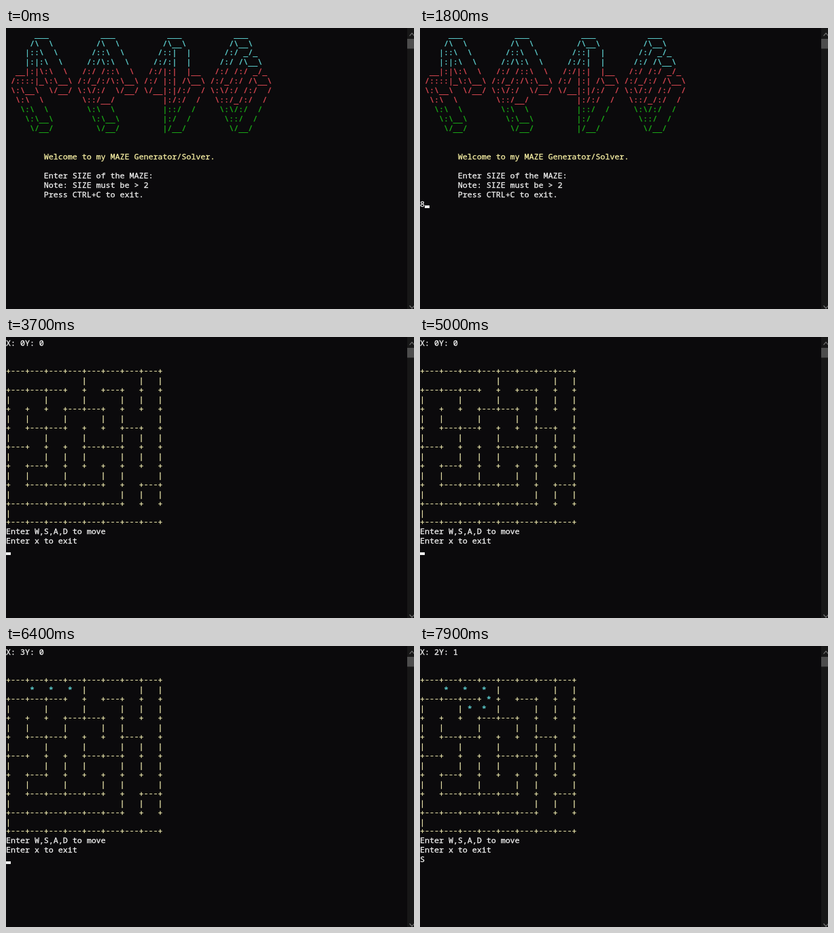
Recreate the animation shown at these times as an HTML page with a canvas. Size 600 by 415 pixels, loop 8000 ms.

```html
<!DOCTYPE html>
<html lang="en">
<head>
<meta charset="utf-8">
<title>Maze console</title>
<style>
html, body { margin: 0; width: 100%; height: 100%; overflow: hidden; background: #0b0a0c; }
canvas { display: block; }
</style>
</head>
<body>
<canvas id="stage" width="600" height="415"></canvas>
<script>
const ctx = document.getElementById('stage').getContext('2d');
const LOOP = 8000, BLINK = 530;
const CELL_W = 6.98, ROW_H = 13.94, BASE = 12.6;
const WHITE = '#f2f2f2', YELLOW = '#f9f1a5', CREAM = '#f5f0b4';
const CYAN = '#61d6d6', RED = '#e04a55', GREEN = '#1cb018';
// Console glyphs whose height differs from the font's own.
const SHIFT = { '-': -1, '_': 1 };

const banner = String.raw`
      ___           ___           ___           ___
     /\  \         /\  \         /\__\         /\__\
    |::\  \       /::\  \       /::|  |       /:/ _/_
    |:|:\  \     /:/\:\  \     /:/:|  |      /:/ /\__\
  __|:|\:\  \   /:/ /::\  \   /:/|:|  |__   /:/ /:/ _/_
 /::::|_\:\__\ /:/_/:/\:\__\ /:/ |:| /\__\ /:/_/:/ /\__\
 \:\__\  \/__/ \:\/:/  \/__/ \/__|:|/:/  / \:\/:/ /:/  /
  \:\  \        \::/__/          |:/:/  /   \::/_/:/  /
   \:\  \        \:\  \          |::/  /     \:\/:/  /
    \:\__\        \:\__\         |:/  /       \::/  /
     \/__/         \/__/         |/__/         \/__/`.split('\n').slice(1);

// One bit per wall segment: horizontal lines, then the rows between them.
const floors = ['11111111', '11100100', '00011000', '01100010', '10001100',
  '01000000', '01111001', '11111100', '11111111'];
const sides = ['000010011', '101010111', '110101101', '101010111',
  '101110111', '110101101', '100000111', '100000000'];

const maze = [];
floors.forEach((bits, i) => {
  maze.push('+' + [...bits].map(b => (b === '1' ? '---+' : '   +')).join(''));
  if (sides[i]) maze.push([...sides[i]].map(b => (b === '1' ? '|' : ' ')).join('   '));
});

// Key pressed, time typed, time applied, position, trail marks [col, row] in the maze.
const moves = [
  { key: 'D', typed: 5300, done: 5500, x: 1, y: 0, marks: [[5, 1]] },
  { key: 'D', typed: 5700, done: 5900, x: 2, y: 0, marks: [[9, 1]] },
  { key: 'D', typed: 6100, done: 6300, x: 3, y: 0, marks: [[13, 1]] },
  { key: 'S', typed: 6500, done: 6700, x: 3, y: 1, marks: [[14, 2], [13, 3]] },
  { key: 'A', typed: 6900, done: 7100, x: 2, y: 1, marks: [[10, 3]] },
  { key: 'S', typed: 7370, done: LOOP }
];

function print(text, col, row, color) {
  ctx.fillStyle = ctx.strokeStyle = color;
  [...text].forEach((ch, i) => {
    if (ch === ' ') return;
    const x = (col + i) * CELL_W;
    const y = Math.round(BASE + row * ROW_H) + (SHIFT[ch] || 0);
    ctx.fillText(ch, x, y);
    ctx.strokeText(ch, x, y);
  });
}

function cursor(t, since, col, row) {
  const age = t - since;
  if (age < 0 || age % (2 * BLINK) >= BLINK) return;
  ctx.fillStyle = WHITE;
  ctx.fillRect(col * CELL_W, Math.round(row * ROW_H + 11.5), 7, 4);
}

function prompt(row) {
  ['Enter SIZE of the MAZE:', 'Note: SIZE must be > 2', 'Press CTRL+C to exit.']
    .forEach((line, i) => print(line, 8, row + i, WHITE));
}

function drawMaze(row, color) {
  maze.forEach((line, i) => print(line, 0, row + i, color));
}

function welcome(t) {
  banner.forEach((line, i) => print(line, 0, i, i < 4 ? CYAN : i < 8 ? RED : GREEN));
  print('Welcome to my MAZE Generator/Solver.', 8, 13, YELLOW);
  prompt(15);
  const typed = 1400;
  if (t >= typed) {
    print('8', 0, 18, WHITE);
    cursor(t, typed, 1, 18);
  } else {
    cursor(t, 100, 0, 18);
  }
}

function menu() {
  prompt(0);
  print('8', 0, 3, WHITE);
  print('...Generating Maze...', 8, 4, YELLOW);
  drawMaze(7, WHITE);
  ['1.Print Maze.', '2.Print Solved Maze.', '3.Solve the Maze.', '4.Exit/New Session']
    .forEach((line, i) => print(line, 8, 25 + i, WHITE));
}

function play(t) {
  let pos = { x: 0, y: 0 }, since = 3500, key = '';
  drawMaze(3, CREAM);
  for (const m of moves) {
    if (t >= m.done) {
      pos = m;
      since = m.done;
      m.marks.forEach(([col, row]) => print('*', col, row + 3, CYAN));
    } else if (t >= m.typed) {
      key = m.key;
      since = m.typed;
    }
  }
  print(`X: ${pos.x}Y: ${pos.y}`, 0, 0, WHITE);
  print('Enter W,S,A,D to move', 0, 20, WHITE);
  print('Enter x to exit', 0, 21, WHITE);
  print(key, 0, 22, WHITE);
  cursor(t, since, key.length, 22);
}

function chevron(y, dir) {
  ctx.beginPath();
  ctx.moveTo(593.5, y + 2 * dir);
  ctx.lineTo(597, y - 2 * dir);
  ctx.lineTo(600.5, y + 2 * dir);
  ctx.stroke();
}

function scrollbar() {
  ctx.fillStyle = '#171717';
  ctx.fillRect(590, 0, 10, 415);
  ctx.fillStyle = '#4d4d4d';
  ctx.fillRect(590, 16, 10, 14.5);
  ctx.strokeStyle = '#707070';
  ctx.lineWidth = 1.2;
  chevron(9.7, 1);
  chevron(412, -1);
}

function frame(t) {
  ctx.fillStyle = '#0b0a0c';
  ctx.fillRect(0, 0, 600, 415);
  scrollbar();

  ctx.font = '11.63px "Noto Sans Mono", "DejaVu Sans Mono", monospace';
  ctx.textBaseline = 'alphabetic';
  ctx.lineWidth = 0.3;
  if (t < 1900) welcome(t);
  else if (t < 3400) menu();
  else play(t);
}

const start = performance.now();
function tick() {
  frame((performance.now() - start) % LOOP);
  requestAnimationFrame(tick);
}
tick();
</script>
</body>
</html>
```
